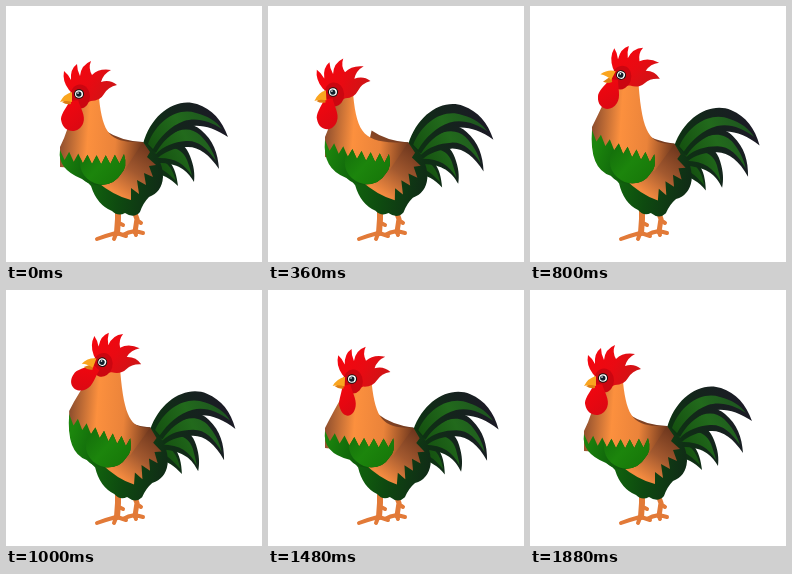
Recreate the animation shown at these times as an HTML page with a canvas. Size 256 by 256 pixels, loop 1.92 s.

```html
<!DOCTYPE html>
<html lang="en">
<head>
<meta charset="utf-8">
<title>Crowing rooster</title>
<style>
html, body { margin: 0; width: 100%; height: 100%; overflow: hidden; background: #fff; }
canvas { display: block; width: 256px; height: 256px; }
</style>
</head>
<body>
<canvas id="stage"></canvas>
<script>
const LOOP = 1920, STEP = 40, PIVOT = [118, 205];
const canvas = document.getElementById('stage');
const ctx = canvas.getContext('2d');
const ratio = window.devicePixelRatio || 1;
canvas.width = canvas.height = Math.round(256 * ratio);

// time, eye x, eye y, head tilt, beak gap, wattle swing, wattle width, chest x, neckline y, body tilt, body shift
const POSES = [
  [0,    73, 88,  0, 0,   5,  22, 54, 147, 0,   0],
  [200,  85, 83, 10, 0,   42, 19, 54, 135, .3,  .5],
  [360,  65, 86, -3, 0,   4,  20, 57, 137, 1.5, 1.5],
  [520,  95, 68, 19, .45, 18, 19, 65, 126, 3.7, 2.5],
  [570,  98, 61, 23, .9,  16, 19, 65, 125, 4,   2.5],
  [800,  91, 69, 19, 1,   18, 20, 62, 127, 4.6, 2],
  [1160, 100, 75, 14, 0,  70, 19, 64, 127, 4,   2.5],
  [1480, 84, 89,  3, 0,  -3,  16, 57, 144, 4.6, 3],
  [1680, 74, 88,  0, 0,   8,  21, 54, 147, .5,  .5],
  [1880, 73, 88,  0, 0,   5,  22, 54, 147, 0,   0],
  [1920, 73, 88,  0, 0,   5,  22, 54, 147, 0,   0]
];

const slope = (i, k) => (POSES[i + 1][k] - POSES[i][k]) / (POSES[i + 1][0] - POSES[i][0]);

// Tangents rest at turning points, so no pose is overshot.
function tangent(i, k) {
  if (i === 0 || i === POSES.length - 1) return 0;
  const a = slope(i - 1, k), b = slope(i, k);
  return a * b <= 0 ? 0 : 2 * a * b / (a + b);
}

function poseAt(t) {
  let i = 0;
  while (i < POSES.length - 2 && t >= POSES[i + 1][0]) i++;
  const from = POSES[i], to = POSES[i + 1], span = to[0] - from[0];
  const u = (t - from[0]) / span, v = 1 - u;
  return from.slice(1).map((value, n) => {
    const k = n + 1;
    return value * (1 + 2 * u) * v * v + to[k] * u * u * (3 - 2 * u)
      + span * u * v * (v * tangent(i, k) - u * tangent(i + 1, k));
  });
}

function blend(x0, y0, x1, y1, ...colors) {
  const g = ctx.createLinearGradient(x0, y0, x1, y1);
  colors.forEach((c, i) => g.addColorStop(i / (colors.length - 1), c));
  return g;
}

function shape(d, fill) {
  ctx.fillStyle = fill;
  ctx.fill(new Path2D(d));
}

function oval(x, y, rx, ry, fill) {
  ctx.fillStyle = fill;
  ctx.beginPath();
  ctx.ellipse(x, y, rx, ry, 0, 0, 7);
  ctx.fill();
}

const rad = deg => deg * Math.PI / 180;

function turn(x, y, deg) {
  const c = Math.cos(rad(deg)), s = Math.sin(rad(deg));
  return [x * c - y * s, x * s + y * c];
}

// Whole feather, then its green vane
const FEATHERS = [
  ['M146 148C160 147 170 158 172 180C164 172 156 168 149 168Z',
   'M148 153C158 152 166 160 170 175C163 168 156 162 149 161Z'],
  ['M144 144C164 131 178 134 184 150C188 160 189 168 188 176C181 164 172 157 152 157Z',
   'M148 146C164 138 176 142 181 154C183 160 185 165 186 170C178 157 168 151 150 152Z'],
  ['M142 140C164 117 183 113 195 124C207 134 212 147 213 163C203 148 192 140 180 141C168 142 158 146 152 152Z',
   'M146 143C166 122 183 119 194 129C202 137 207 145 210 155C201 142 192 134 180 135C168 136 157 140 150 148Z'],
  ['M137 138C145 108 170 91 191 98C206 103 216 114 222 131C206 120 190 117 178 122C165 127 156 136 150 147Z',
   'M142 138C151 114 172 101 190 107C202 110 210 115 216 123C204 115 190 111 178 115C164 120 154 131 147 143Z']
];

function drawTail() {
  for (const [whole, vane] of FEATHERS) {
    shape(whole, blend(145, 150, 215, 125, '#0d3312', '#14241c', '#1b1b25'));
    shape(vane, blend(145, 150, 215, 115, '#14500f', '#226a1c', '#1d5220'));
  }
}

function drawBody() {
  shape('M64 158C71 171 79 173 85 180Q91 199 106 205Q112 211 119 207Q128 213 134 206Q137 197 143 191Q156 186 157 171Q157 150 137 136L100 138Z',
    blend(75, 165, 155, 175, '#126c0c', '#0e4a10', '#102c16'));
  shape('M100 125Q115 135 137 136L144 146L141 151L150 159L143 160L147 171L138 167L140 179L131 174L133 188L125 182L125 194Q108 190 90 175Z',
    blend(143, 143, 112, 188, '#70381e', '#a3592f', '#f48b40'));
}

function drawLegs() {
  ctx.strokeStyle = '#e27a38';
  ctx.lineCap = ctx.lineJoin = 'round';
  ctx.lineWidth = 5;
  ctx.stroke(new Path2D('M128 205L131 213L129 226'));
  ctx.lineWidth = 6;
  ctx.stroke(new Path2D('M112 205L112 213L111 227'));
  ctx.lineWidth = 4;
  ctx.stroke(new Path2D('M129 225Q122 226 117 229M129 226L130 229M129 225L137 227M110 227Q99 230 91 233M110 228L108 233M111 227L120 230M113 217L117 219M132 215L135 217'));
}

function drawChest(eye, tilt, chestX, lineY, toBody) {
  const local = (x, y) => turn(x, y, tilt).map((v, i) => v + eye[i]);
  const [lx, ly] = local(-5, 10), [rx, ry] = local(20, 4);
  const [bx, by] = toBody(137, 136), [wx, wy] = toBody(118, 151);
  shape(`M${lx} ${ly}Q${chestX + 9} ${lineY - 24} ${chestX} ${lineY - 6}L${chestX} ${lineY + 14}L${wx} ${wy + 14}L${bx} ${by}C${rx + 12} ${by + 1} ${rx + 4} 130 ${rx} ${ry}Z`,
    blend(chestX, 132, bx, 138, '#8f4f2e', '#fc903e', '#ea833a', '#70381e'));

  const teeth = 7;
  let d = `M${chestX} ${lineY - 3}`;
  for (let i = 1; i <= teeth * 2; i++) {
    const u = i / (teeth * 2);
    const x = chestX + (wx - chestX) * u;
    const y = lineY + (wy - lineY) * u + 3 * Math.sin(Math.PI * u) + (i % 2 ? 6 : -3);
    d += `L${x} ${y}`;
  }
  const [ax, ay] = toBody(118, 167), [cx, cy] = toBody(96, 179), [ex, ey] = toBody(76, 173);
  d += `Q${ax + 4} ${ay - 6} ${ax - 3} ${ay + 1}Q${ax - 9} ${ay + 11} ${cx} ${cy}Q${cx - 12} ${cy + 1} ${ex} ${ey}Q${chestX - 3} 163 ${chestX} ${lineY - 3}Z`;
  shape(d, blend(chestX, 150, chestX + 45, 165, '#1c860d', '#126c0b', '#0c520a'));

  const [ox, oy] = toBody(98, 157);
  ctx.save();
  ctx.clip(new Path2D(d));
  oval(ox, oy, 24, 22, blend(ox - 20, oy - 16, ox + 16, oy + 16, '#14700b', '#1c850c', '#177809'));
  ctx.restore();
}

function drawHead([x, y], tilt, gap, swing, width) {
  ctx.save();
  ctx.translate(x, y);
  ctx.rotate(rad(tilt));
  shape('M-10 -4Q-17 -13 -15 -23Q-11 -20 -8 -14Q-9 -25 -2 -30Q-2 -24 1 -18Q2 -29 12 -33Q9 -26 13 -19Q20 -26 32 -24Q24 -20 22 -12Q31 -15 38 -9Q29 -7 25 0Q21 7 12 7L4 10Z',
    blend(-12, -20, 30, 2, '#f4060f', '#e90a12', '#cf1416'));
  oval(1, 2.5, 10, 12, '#cb0610');
  ctx.restore();

  // The wattle hangs by its own swing, whatever the head does.
  const [wx, wy] = turn(-5, 8, tilt), w = width / 2;
  ctx.save();
  ctx.translate(x + wx, y + wy);
  ctx.rotate(rad(swing));
  shape(`M-4 -1C${-w * .7} 7 ${-w * 1.2} 15 ${-w} 20C${-w * .7} 32 ${w * .7} 32 ${w} 20C${w * 1.2} 13 ${w * .6} 5 4 -2Z`,
    blend(-w, 0, w, 20, '#f4060f', '#dd0812'));
  ctx.restore();

  ctx.save();
  ctx.translate(x, y);
  ctx.rotate(rad(tilt));
  ctx.save();
  ctx.translate(-8, 6);
  ctx.rotate(rad(-30 * gap));
  shape('M0 -2L-9 2Q-5 5 0 4Z', '#dd7d14');
  ctx.restore();
  ctx.save();
  ctx.translate(-7, 3);
  ctx.rotate(rad(9 * gap));
  shape('M0 -5Q-8 -3 -12 5Q-6 3 0 5Z', '#faa51f');
  ctx.restore();
  oval(0, 0, 5, 4.8, '#16120f');
  oval(0, 0, 4, 3.8, '#fff');
  oval(-.2, .1, 2.7, 2.7, '#10202c');
  oval(-1, -.9, .8, .8, '#fff');
  ctx.restore();
}

function draw(t) {
  const [ex, ey, tilt, gap, swing, width, chestX, lineY, lean, shift] = poseAt(t);
  const toBody = (x, y) => {
    const p = turn(x - PIVOT[0], y - PIVOT[1], lean);
    return [p[0] + PIVOT[0] + shift, p[1] + PIVOT[1]];
  };
  ctx.setTransform(ratio, 0, 0, ratio, 0, 0);
  ctx.fillStyle = '#fff';
  ctx.fillRect(0, 0, 256, 256);
  drawLegs();
  ctx.save();
  ctx.translate(PIVOT[0] + shift, PIVOT[1]);
  ctx.rotate(rad(lean));
  ctx.translate(-PIVOT[0], -PIVOT[1]);
  drawTail();
  drawBody();
  ctx.restore();
  drawChest([ex, ey], tilt, chestX, lineY, toBody);
  drawHead([ex, ey], tilt, gap, swing, width);
}

const start = performance.now();
function tick() {
  const t = (performance.now() - start) % LOOP;
  draw(Math.floor(t / STEP) * STEP);
  requestAnimationFrame(tick);
}
tick();
</script>
</body>
</html>
```
